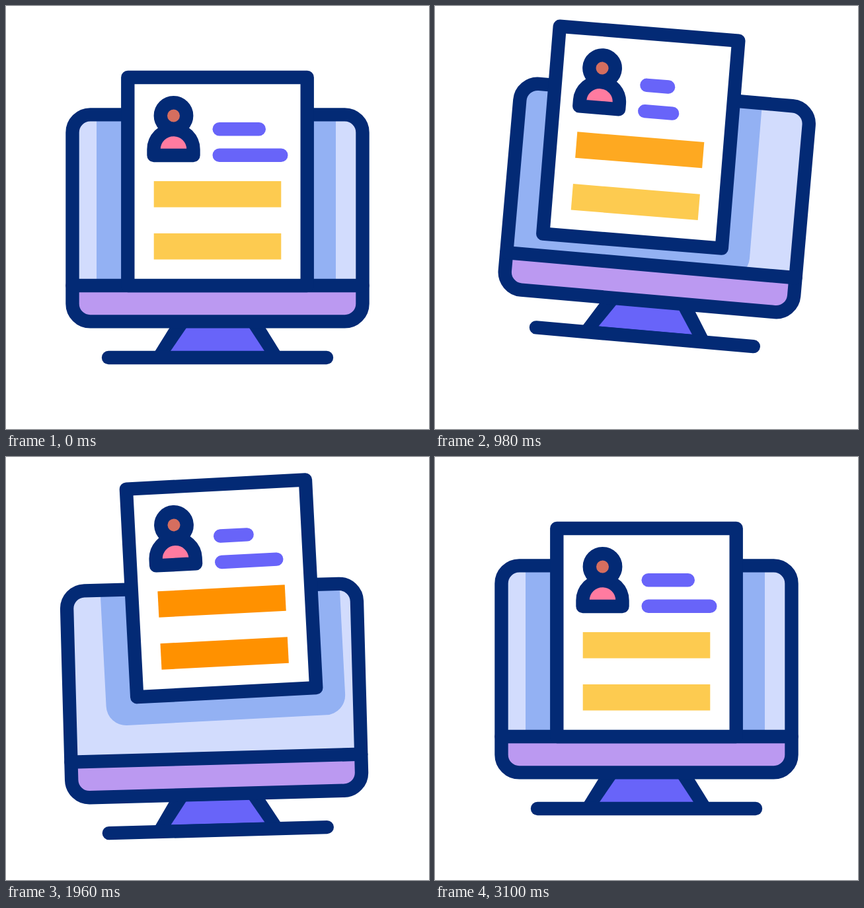
These frames come from a looping animation (640x640 px, 3.6 s). An HTML page:

```html
<!DOCTYPE html>
<html lang="en">
<head>
<meta charset="utf-8">
<title>Profile on a monitor</title>
<style>
  html, body { margin: 0; width: 100%; height: 100%; overflow: hidden; background: #fff; }
  svg { display: block; width: 100%; height: 100%; }

  .navy { fill: #032a75; }
  .line { stroke: #032a75; stroke-width: 20.4; stroke-linejoin: round; stroke-linecap: round; }
  .violet { fill: #6864f9; }

  /* The small negative delay makes up for the first paint. */
  .monitor, .sheet, .head, .torso, .text, .bar {
    animation: 3600ms cubic-bezier(.3333, 0, .6667, 1) -14ms infinite;
    transform-box: view-box;
  }
  .monitor { transform-origin: 320px 502px; animation-name: hover, sway; }
  .sheet { transform-origin: 320px 158px; animation-name: lift, swing; }
  .head { animation-name: nod; }
  .torso { animation-name: shrug; }
  .first { animation-name: write1; }
  .second { animation-name: write2; }
  .bar { fill: #fdcb50; animation-name: glow1; }
  .late { animation-name: glow2; }

  @keyframes hover {
    0%, 7.36% { translate: 0 0; }
    21.9% { translate: 0 -57px; }
    40.5%, 42.8% { translate: 0 57px; }
    69.5%, 100% { translate: 0 0; }
  }
  @keyframes sway {
    0%, 15.22% { rotate: 0deg; }
    27.25% { rotate: 5deg; }
    44.97% { rotate: -5deg; }
    60.72%, 100% { rotate: 0deg; }
  }
  @keyframes lift {
    0%, 9.5% { translate: 0 0; }
    25%, 72.06% { translate: 0 -66.5px; }
    84.17%, 100% { translate: 0 0; }
  }
  @keyframes swing {
    0%, 11.11% { rotate: 0deg; }
    30.83% { rotate: 5deg; }
    50.28% { rotate: -5deg; }
    66.11% { rotate: 5deg; }
    84.17%, 100% { rotate: 0deg; }
  }
  @keyframes nod {
    0%, 36.1% { translate: 0 0; }
    45% { translate: 0 -6px; }
    54.4%, 100% { translate: 0 0; }
  }
  @keyframes shrug {
    0%, 36.1% { d: path("M223.5 226V217A30 30 0 0 1 283.5 217V226Z"); }
    45% { d: path("M223.5 226V217A30 35 0 0 1 283.5 217V226Z"); }
    54.4%, 100% { d: path("M223.5 226V217A30 30 0 0 1 283.5 217V226Z"); }
  }
  @keyframes write1 {
    0%, 13.9% { width: 80.5px; }
    22.5% { width: 44px; }
    42.8% { width: 102px; }
    61.56% { width: 44px; }
    80.56%, 100% { width: 80.5px; }
  }
  @keyframes write2 {
    0%, 15.56% { width: 114px; }
    29.44% { width: 60px; }
    47.5% { width: 125px; }
    66.67% { width: 60px; }
    85.2%, 100% { width: 114px; }
  }
  @keyframes glow1 {
    0%, 23.9% { fill: #fdcb50; }
    30.6%, 76.7% { fill: #ff9100; }
    83.3%, 100% { fill: #fdcb50; }
  }
  @keyframes glow2 {
    0%, 36.7% { fill: #fdcb50; }
    43.3%, 76.7% { fill: #ff9100; }
    83.3%, 100% { fill: #fdcb50; }
  }
</style>
</head>
<body>
<svg viewBox="0 0 640 640">
  <defs>
    <clipPath id="screen">
      <rect class="monitor" x="100.5" y="164.4" width="439" height="258.6" rx="27"/>
    </clipPath>
  </defs>

  <g class="monitor">
    <path class="navy" d="M248 486H392L415 523H225Z"/>
    <path class="violet" d="M273 487H368L391 522H249Z"/>
    <path class="line" d="M155 532H485"/>
    <rect x="100.5" y="164.4" width="439" height="313" rx="27" fill="#d2dcfd"/>
    <path d="M100.5 423H539.5V450.4A27 27 0 0 1 512.5 477.4H127.5A27 27 0 0 1 100.5 450.4Z" fill="#bb99f1"/>
  </g>

  <g clip-path="url(#screen)">
    <rect class="sheet" x="137" y="60" width="362" height="405" rx="30" fill="#93b1f3"/>
  </g>

  <g class="monitor">
    <rect class="line" x="100.5" y="164.4" width="439" height="313" rx="27" fill="none"/>
    <path class="line" d="M100.5 423H539.5"/>
  </g>

  <g class="sheet">
    <rect class="line" x="184.3" y="108" width="271.4" height="315" fill="#fff"/>
    <path class="torso line" d="M223.5 226V217A30 30 0 0 1 283.5 217V226Z" fill="#ff7ba0"/>
    <circle class="head line" cx="253.5" cy="166" r="19.7" fill="#d56e5f"/>
    <rect class="text first violet" x="312.5" y="176" width="80.5" height="20.4" rx="10.2"/>
    <rect class="text second violet" x="312.5" y="215.5" width="114" height="20.4" rx="10.2"/>
    <rect class="bar" x="223.7" y="265" width="192.6" height="39.5"/>
    <rect class="bar late" x="223.7" y="344" width="192.6" height="39.5"/>
  </g>
</svg>
</body>
</html>
```
